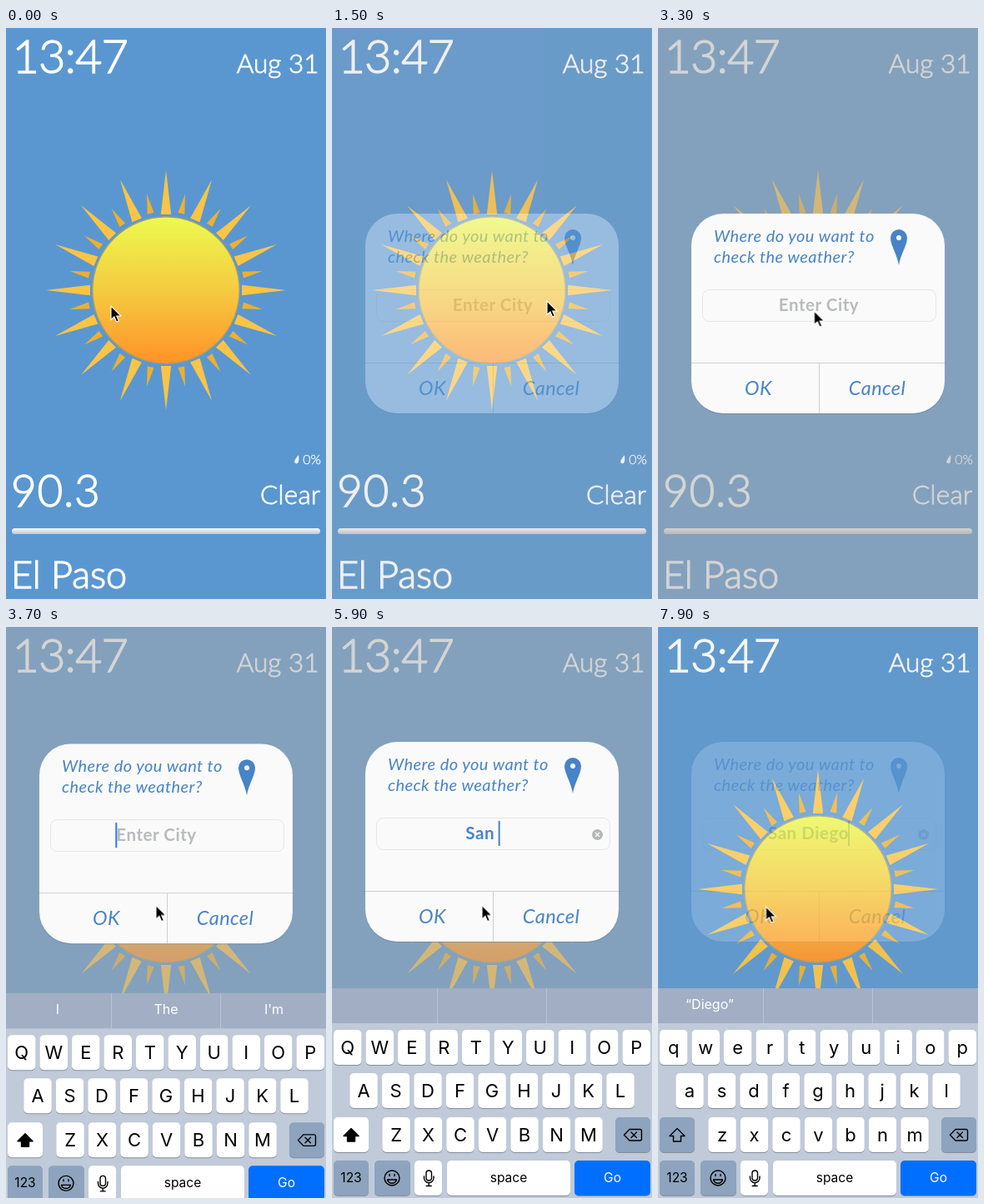
Write an HTML page that moves like this. It is 384 px wide and 686 px high and loops after 8 s.

```html
<!DOCTYPE html>
<html lang="en">
<head>
<meta charset="utf-8">
<title>Weather city search</title>
<style>
  html, body { margin: 0; width: 100%; height: 100%; overflow: hidden; background: #5a97d1; }
  svg { display: block; width: 384px; height: 686px; }
  text { white-space: pre; }
  .info { font-family: Lato, "Open Sans", sans-serif; font-weight: 300; fill: #fff; stroke: #fff; }
  .large { stroke-width: 1.3; }
  .medium { stroke-width: .8; }
  .tiny { stroke-width: .35; }
  .title { font: italic 400 20px Lato, sans-serif; letter-spacing: .45px; fill: #4783c8; }
  .button { font: italic 400 23.5px Lato, sans-serif; letter-spacing: .4px; fill: #4783c8; text-anchor: middle; }
  .field { font: 700 20.5px Lato, sans-serif; letter-spacing: .55px; text-anchor: middle; }
  .end { text-anchor: end; }

  #shade, #dialog { animation: fade 8s infinite; }
  #lift { animation: lift 8s infinite; }
  #keyboard { animation: rise 8s infinite; }
  #pointer { animation: point 8s infinite ease-in-out; }

  @keyframes fade {
    0%, 15% { opacity: 0; animation-timing-function: ease-in-out; }
    23.75%, 93.1% { opacity: 1; animation-timing-function: ease-in; }
    98.75% { opacity: .21; }
    100% { opacity: .08; }
  }
  @keyframes lift {
    0%, 41.875% { transform: none; animation-timing-function: cubic-bezier(.25, .7, .3, 1); }
    48.125%, 100% { transform: translateY(-85px); }
  }
  @keyframes rise {
    0%, 41.875% { transform: translateY(252px); animation-timing-function: cubic-bezier(.25, .7, .3, 1); }
    48.125%, 100% { transform: none; }
  }
  @keyframes point {
    0% { transform: translate(126px, 334px); }
    10%, 13% { transform: translate(70px, 642px); }
    18.75% { transform: translate(258px, 328px); }
    26%, 41% { transform: translate(187.5px, 340px); }
    45%, 87% { transform: translate(180px, 334.5px); }
    91.5%, 94% { transform: translate(118px, 344px); }
    98.75%, 100% { transform: translate(129.5px, 336px); }
  }

  #keyboard text { font: 400 22px Inter, Roboto, sans-serif; text-anchor: middle; fill: #000; }
  #keyboard .small { font-size: 15.5px; }
  #keyboard .hint { font-size: 16px; fill: #fff; }
  #keyboard .letter { text-transform: lowercase; }
  #keyboard.upper .letter { text-transform: uppercase; }
  .icon { fill: none; stroke: #000; stroke-width: 1.4; stroke-linejoin: round; stroke-linecap: round; }
  .upper #arrow { fill: #000; }
  #shift { fill: #8da3be; }
  .upper #shift { fill: #fff; }
</style>
</head>
<body>
<svg viewBox="0 0 384 686">
  <defs>
    <linearGradient id="glow" x2="0" y2="1">
      <stop offset="0" stop-color="#ecfa4e"/>
      <stop offset=".5" stop-color="#f5cb40"/>
      <stop offset="1" stop-color="#ff9228"/>
    </linearGradient>
    <linearGradient id="metal" x2="0" y2="1">
      <stop offset="0" stop-color="#f6f6f6"/>
      <stop offset="1" stop-color="#c9c9c9"/>
    </linearGradient>
  </defs>

  <rect width="384" height="686" fill="#5a97d1"/>
  <g id="rays"></g>
  <circle cx="192" cy="315" r="88.3" fill="url(#glow)" stroke="#9a9f78" stroke-width="1.6"/>

  <g class="info">
    <text class="large" x="7.500" y="54" font-size="56" letter-spacing="-1">13:47</text>
    <text class="medium end" x="375.500" y="54" font-size="31.5">Aug 31</text>
    <text class="large" x="6" y="575" font-size="53" letter-spacing=".7">90.3</text>
    <text class="medium end" x="377.500" y="572" font-size="31.5" letter-spacing=".3">Clear</text>
    <text class="tiny end" x="378" y="524" font-size="16">0%</text>
    <text class="large" x="6" y="673" font-size="45">El Paso</text>
  </g>
  <path d="M351 513q.8 6 -.4 9a2.4 2.4 0 0 1-4.4-1.6q1-3 4.800-7.400z" fill="#fff"/>
  <rect x="7" y="601" width="370" height="7" rx="3.500" fill="url(#metal)"/>

  <g id="lift">
    <!-- The shade leaves a hole where the dialog sits. -->
    <path id="shade" fill="#ababab" fill-opacity=".51" fill-rule="evenodd"
      d="M0 0H384V800H0zM78 223H306a38 38 0 0 1 38 38V425a38 38 0 0 1-38 38H78a38 38 0 0 1-38-38V261a38 38 0 0 1 38-38z"/>
    <g id="dialog">
      <rect x="40" y="224" width="304" height="240" rx="38" fill="#5d7896" opacity=".55"/>
      <rect x="40" y="223" width="304" height="240" rx="38" fill="#fafafa"/>
      <path d="M40 402.500H344M193.500 402.500V463" stroke="#cfcfcf"/>
      <text class="title" x="67" y="257">Where do you want to</text>
      <text class="title" x="67" y="282">check the weather?</text>
      <path d="M289 285C287 272 279 261 279 252a10 10 0 0 1 20 0C299 261 291 272 289 285z" fill="#4783c8"/>
      <circle cx="289" cy="252" r="3" fill="#fafafa"/>
      <rect x="53.500" y="314.500" width="280" height="38" rx="8" fill="#fafafa" stroke="#e6e6e6"/>
      <text id="city" class="field" y="339.500"></text>
      <rect id="caret" y="318" width="2" height="30"/>
      <g id="clear">
        <circle cx="318.500" cy="334.500" r="6.500" fill="#b4b6b9"/>
        <path d="M316 332l5 5m0-5l-5 5" stroke="#fafafa" stroke-width="1.300"/>
      </g>
      <text class="button" x="120.500" y="441">OK</text>
      <text class="button" x="263" y="441">Cancel</text>
    </g>
  </g>

  <g id="keyboard">
    <rect y="434" width="384" height="252" fill="#c0cad8"/>
    <rect y="434" width="384" height="42" fill="#a2aec3"/>
    <path d="M126.500 434V476M257.500 434V476" stroke="#b9c3d3"/>
    <text class="hint" x="62" y="459"></text>
    <text class="hint" x="192" y="459"></text>
    <text class="hint" x="321.500" y="459"></text>
    <g id="keys"></g>
    <path id="arrow" class="icon" d="M23 602.500l9 9h-4.500v6.500h-9v-6.500h-4.500z"/>
    <g class="icon">
      <path d="M357 603.500h12.500a2 2 0 0 1 2 2v9.500a2 2 0 0 1-2 2H357l-6.500-6.700zM359 607l6.500 6.500m0-6.500l-6.500 6.500"/>
      <circle cx="72" cy="662" r="9"/>
      <path d="M66.500 664a5.700 5.700 0 0 0 11 0zM69 657.500v2m6-2v2"/>
      <rect x="113" y="653" width="6.500" height="12" rx="3.200"/>
      <path d="M110.500 660v2a5.700 5.700 0 0 0 11.500 0v-2M116.200 668v3.500m-3 0h6"/>
    </g>
  </g>

  <path id="pointer" d="M0 0V16.500L3.900 13L6.600 19L9.300 17.900L6.700 12H12z" fill="#000" stroke="#fff" stroke-width="1.100"/>
</svg>

<script>
const LOOP = 8000, FOCUS = 3350, FIELD_X = 180.5;
const $ = id => document.getElementById(id);

function add(parent, name, attrs, label = '') {
  const el = document.createElementNS('http://www.w3.org/2000/svg', name);
  for (const key in attrs) el.setAttribute(key, attrs[key]);
  el.textContent = label;
  parent.append(el);
  return el;
}

// Sun: long and short rays alternate every 11.25 degrees.
for (let i = 0; i < 32; i++) {
  const [tip, base, half, fill] = i % 2 ? [118, 94, 4, '#efb02a'] : [144, 91, 6.2, '#fbc444'];
  add($('rays'), 'path', {
    d: `M0 ${-tip}L${half} ${-base}H${-half}z`, fill,
    transform: `translate(192 315) rotate(${i * 11.25})`
  });
}

function key(x, y, w, label, cls, fill = '#fff', id = '') {
  add($('keys'), 'rect', { x, y: y + 1, width: w, height: 42, rx: 5, fill: '#858d99' });
  add($('keys'), 'rect', { x, y, width: w, height: 42, rx: 5, fill, id });
  if (label) {
    const drop = cls === 'letter' ? 28.5 : 26;
    return add($('keys'), 'text', { x: x + w / 2, y: y + drop, class: cls }, label);
  }
}

const rows = [['qwertyuiop', 2, 484], ['asdfghjkl', 21.3, 536], ['zxcvbnm', 60.3, 589]];
for (const [letters, x, y] of rows)
  [...letters].forEach((c, i) => key(x + i * 38.5, y, 33.5, c, 'letter'));
const GREY = '#8da3be';
key(2, 589, 42, '', '', GREY, 'shift');
key(340, 589, 42, '', '', GREY);
key(2, 641, 42, '123', 'small', GREY);
key(51, 641, 43, '', '', GREY);
key(99, 641, 33, '');
key(138, 641, 148, 'space', 'small');
key(291, 641, 91, 'Go', 'small', '#006fff').style.fill = '#fff';

const CITY = 'San Diego';
const strokes = [5000, 5300, 5500, 5800, 6400, 6500, 6600, 6700, 6800];
const hints = document.querySelectorAll('.hint');
const city = $('city'), caret = $('caret');

function draw(t) {
  const count = strokes.filter(s => s <= t).length;
  const typed = CITY.slice(0, count);
  const focused = t >= FOCUS;
  const upper = !typed || typed.endsWith(' ');
  const word = typed.split(' ').pop();

  city.textContent = typed || 'Enter City';
  const middle = focused ? FIELD_X : 193;
  city.setAttribute('x', middle);
  city.style.fill = typed ? '#4783c8' : '#b9bbbe';

  const half = city.getComputedTextLength() / 2;
  caret.setAttribute('x', middle + (typed ? half - 1 : -half - 1));
  caret.style.fill = typed ? '#4783c8' : '#2b78f0';
  const since = count ? t - strokes[count - 1] : t - 3300;
  const phase = since % 1000 / 1000;
  const blink = Math.max(1 - Math.max(phase - .42, 0) / .16, (phase - .85) / .15, 0);
  caret.style.opacity = focused ? Math.min(blink, 1) : 0;

  $('clear').style.display = typed ? '' : 'none';
  $('keyboard').classList.toggle('upper', upper);
  const words = typed ? [word && `“${word}”`, '', ''] : ['I', 'The', 'I\'m'];
  hints.forEach((el, i) => el.textContent = words[i]);
}

// The typing follows the same clock as the CSS motion.
const clock = $('pointer').getAnimations()[0];
function tick() {
  draw((clock.currentTime || 0) % LOOP);
  requestAnimationFrame(tick);
}
tick();
</script>
</body>
</html>
```
